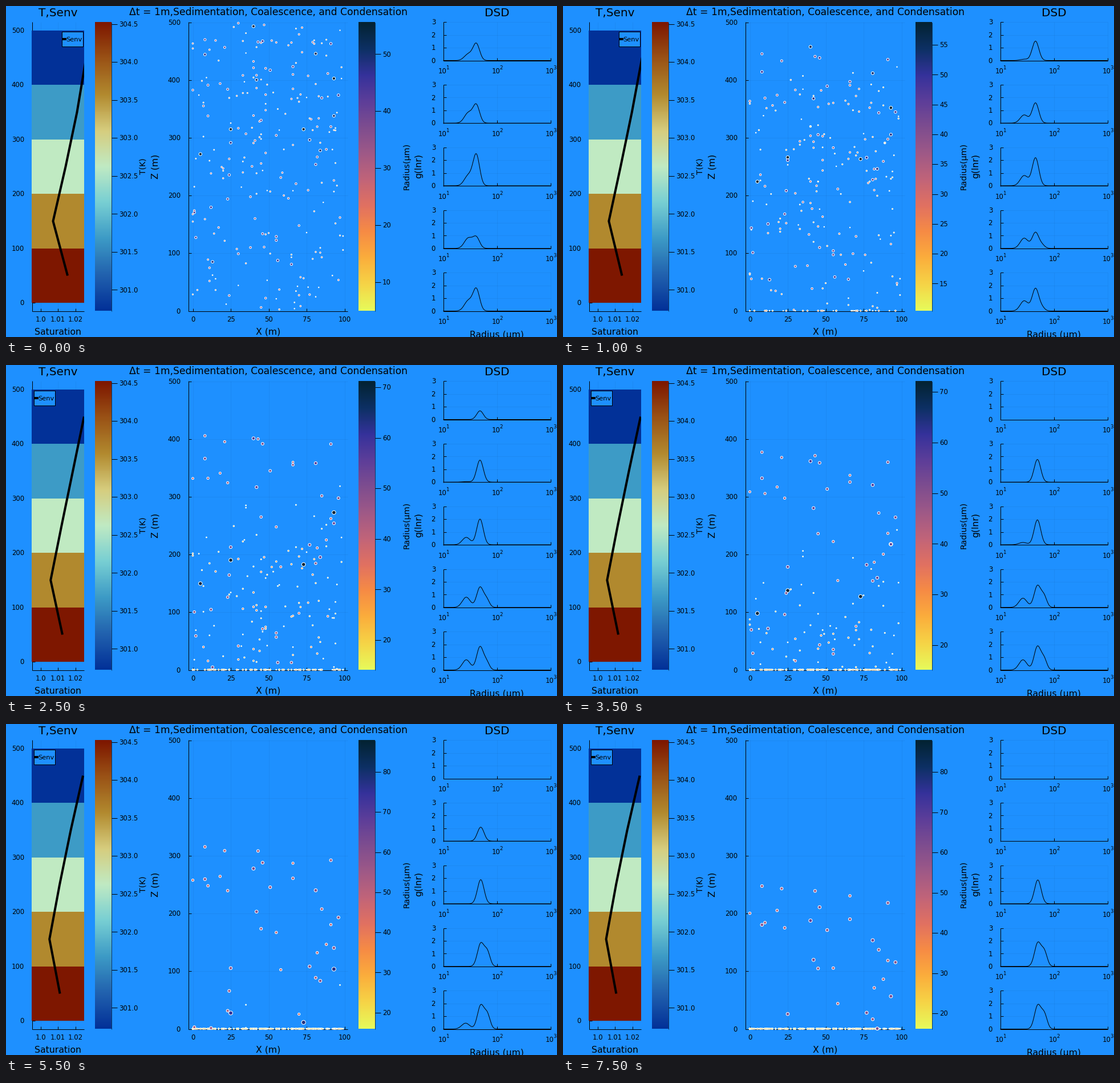
Recreate the animation shown at these times as a matplotlib script. Size 966x580 px, loop 8 s.

```python
import numpy as np
import matplotlib.pyplot as plt
from matplotlib.animation import FuncAnimation
from matplotlib.colors import LinearSegmentedColormap
from matplotlib.patches import Rectangle

W, H, DPI = 966, 580, 64
PT = 72 / DPI  # points per pixel
FRAMES, INTERVAL = 16, 500
SKY = "#1e90ff"

plt.rcParams["font.family"] = "DejaVu Sans"
fig = plt.figure(figsize=(W / DPI, H / DPI), dpi=DPI, facecolor=SKY)
ax = fig.add_axes([0, 0, 1, 1])


def color_map(name, stops):
    return LinearSegmentedColormap.from_list(name, stops.split())


heat = color_map("heat", "#023198 #2263af #3d9bc6 #78cfd3 #c0eac3 #d6cd7e #b28a2f #9a5316 #7e1700")
depth = color_map("depth", "#e7fa5a #f6d346 #fbad3c #f68b45 #e17161 #c16479 "
                           "#9e5987 #7e4d8f #5d3e99 #35329b #0d3064 #032333")


def line(xs, ys, width=1.0, **kw):
    kw = {"color": "black", "solid_capstyle": "butt", **kw}
    return ax.plot(xs, ys, lw=width * PT, **kw)[0]


def label(x, y, text, size=11.6, ha="center", **kw):
    """Text whose capitals are centred on y."""
    return ax.text(x, y + 0.36 * size, text, fontsize=size * PT, ha=ha, va="baseline", **kw)


def side_label(x, text, size):
    ax.text(x, 281, text, fontsize=size * PT, rotation=90, ha="center", va="center")


def axes_box(left, right, top, bottom, xticks, yticks):
    for x in xticks:
        line([x, x], [top, bottom], 0.6, alpha=0.08)
        line([x, x], [bottom - 5, bottom])
    for y in yticks:
        line([left, right], [y, y], 0.6, alpha=0.08)
        line([left, left + 5], [y, y])
    line([left, left], [top, bottom + 0.5])
    line([left, right], [bottom, bottom])


def color_bar(left, cmap):
    ax.imshow(np.linspace(1, 0, 256)[:, None], cmap=cmap, aspect="auto",
              extent=(left, left + 29, 534.5, 28.5), interpolation="bilinear")
    line([left + 29] * 2, [28.5, 534.5], 0.6)


def bar_tick(x, y, text):
    return [line([x, x + 10], [y, y]), label(x + 13, y, text, ha="left")]


# Temperature layers and environment saturation
layer_y = [42.6 + 95.5 * i for i in range(6)]
axes_box(45.5, 137, 28, 534.5, (60.5, 91, 121.5), layer_y)
for i, y in enumerate(layer_y):
    label(32, y, str(500 - 100 * i), ha="right")
    if i < 5:
        ax.add_patch(Rectangle((45, y), 91.5, 95.5, lw=0, antialiased=False,
                               color=heat(i / 4), zorder=3))
for i, text in enumerate(("1.0", "1.01", "1.02")):
    label(60.5 + 30.5 * i, 549, text)
label(91, 11, "T,Senv", 20)
label(91, 570, "Saturation", 15.7)

color_bar(156, heat)
for i in range(8):
    bar_tick(185, 31.5 + 66.57 * i, f"{304.5 - 0.5 * i:.1f}")
side_label(241, "T(K)", 14)

SENV_START = np.array([108, 82.5, 104.5, 124.5, 140.5])
SENV_END = np.array([92, 75, 92, 111.5, 134])
senv_y = 472.5 - 95.5 * np.arange(5)
senv_line = line([], [], 4, zorder=5, solid_joinstyle="round")
senv_line.set_clip_path(Rectangle((45, 28), 91.5, 506, transform=ax.transData))

legend_box = ax.add_patch(Rectangle((97.5, 44.5), 37, 26, fc=SKY, ec="black", lw=PT, zorder=6))
legend_key = line([], [], 4, zorder=7)
legend_text = label(105, 58, "Senv", 11.4, ha="left", zorder=7)

# Droplet chamber
X0, X_SCALE, GROUND = 327.5, 2.66, 534
x_ticks = [X0 + 66.5 * i for i in range(5)]
z_ticks = [534.5 - 101.2 * i for i in range(6)]
axes_box(319.5, 599, 28, 534.5, x_ticks, z_ticks)
for i, x in enumerate(x_ticks):
    label(x, 549, str(25 * i))
for i, y in enumerate(z_ticks):
    label(306, y, str(100 * i), ha="right")
label(459.5, 9.5, "Δt = 1m,Sedimentation, Coalescence, and Condensation", 17.1)
label(460, 570, "X (m)", 15.7)
side_label(262, "Z (m)", 15.7)
color_bar(618, depth)
side_label(703, "Radius(µm)", 14.2)

rng = np.random.default_rng(5)
SMALL, LARGE = 190, 36
small_size = rng.random(SMALL)
small_y = rng.uniform(30, 532, SMALL)

# Most prominent drops: column, starting height on the stage, starting speed
LEADERS = np.array([(8, 59, 12), (40, 35.5, 17.6), (43, 63, 12.3), (46, 61.5, 14.3),
                    (81, 83.5, 16.7), (91, 66, 13.5), (93, 127, 25.3), (73, 216, 25.7),
                    (25, 216, 24.2), (5, 259.5, 23.7)])
large_x = np.concatenate([LEADERS[:, 0], rng.integers(0, 100, LARGE)])
large_y = np.concatenate([LEADERS[:, 1], rng.uniform(70, 470, LARGE)])
large_speed = np.concatenate([LEADERS[:, 2], rng.uniform(9, 16, LARGE)])

drop_x = X0 + X_SCALE * np.concatenate([rng.integers(0, 100, SMALL), large_x])
drops = ax.scatter(drop_x, drop_x, edgecolors="white", linewidths=PT, zorder=5)


def drop_state(k, low, high):
    """Heights and radii; condensation makes every drop fall faster with time."""
    small_fall = (32 * k + 0.65 * k * k) * (0.95 + 0.9 * small_size)
    large_fall = large_speed * k + 0.2 * k * k
    y = np.concatenate([small_y + small_fall, large_y + large_fall])
    large_r = 50 * ((large_speed + 0.4 * k) / 16) ** 0.7
    r = np.clip(np.concatenate([10 + 26 * small_size, large_r]), low, high)
    return np.minimum(y, GROUND), np.where(y >= GROUND, np.minimum(r, 25), r)


# Size distributions
UNIT, DECADE, LEFT = 22.4, 94, 766.5
BASES = [95.5 + 109.75 * i for i in range(5)]
offset = np.linspace(0, 188, 377)
curves = []
for base in BASES:
    axes_box(LEFT, 954.5, base - 3 * UNIT, base, [LEFT + DECADE * i for i in range(3)],
             [base - UNIT * i for i in range(4)])
    for i in range(4):
        label(753, base - UNIT * i, str(i), ha="right")
    for i in range(3):
        x = LEFT + DECADE * i
        label(x - 9, base + 18.5, "10", ha="left")
        label(x + 5, base + 12.5, str(i + 1), 8.8, ha="left")
    curves.append(line([], [], zorder=5))
label(860.5, 11, "DSD", 20)
label(860.5, 575, "Radius (µm)", 15.6)
side_label(724, "g(lnr)", 15.7)

START_PEAK = (1.3, 1.4, 2.4, 0.85, 1.7)


def bump(center, height, width):
    return height * np.exp(-0.5 * ((offset - center) / width) ** 2)


def distribution(layer, k):
    """Layers empty from the top down: first the fine mode, then the main one."""
    settle = np.exp(-k / 4)
    peak = START_PEAK[layer] * settle + 1.85 * (1 - settle)
    main = peak * np.clip((7 * (layer + 1) - k) / 5, 0, 1)
    fine = 0.8 * np.clip((2.5 + 2.7 * layer - k) / 4, 0, 1)
    tail = 1.1 * min(1, k / 9) * (layer > 2)
    main_pos = 66 - 8 * np.exp(-k / 3)
    return (bump(main_pos, main, 5.8) + bump(39 + 5 * settle, fine, 7)
            + bump(main_pos + 11.5, tail, 5))


radius_marks = []


def draw_radius_ticks(low, high):
    while radius_marks:
        radius_marks.pop().remove()
    step = 5 if high - low < 50 else 10
    for r in range(step * int(np.ceil(low / step)), int(high) + 1, step):
        y = 28.5 + 506 * (high - r) / (high - low)
        radius_marks.extend(bar_tick(647, y, str(r)))


def draw(k):
    senv_line.set_data(SENV_END + (SENV_START - SENV_END) * np.exp(-k / 6), senv_y)
    left = 97.5 if k < 3 else 48.5
    legend_box.set_x(left)
    legend_key.set_data([left, left + 8.5], [58, 58])
    legend_text.set_x(left + 8)

    low = 16.2 - 11.3 * np.exp(-k / 3)
    high = np.interp(k, (0, 2, 4, 5, 9, 10, 11), (55.6, 58.8, 64, 71.2, 73, 87.5, 87.9))
    draw_radius_ticks(low, high)
    y, r = drop_state(k, low, high)
    drops.set_offsets(np.column_stack([drop_x, y]))
    drops.set_sizes(((0.085 * r + 0.5) * PT) ** 2)
    drops.set_facecolor(depth((r - low) / (high - low)))

    for layer, (curve, base) in enumerate(zip(curves, BASES)):
        curve.set_data(LEFT + offset, base - UNIT * distribution(layer, k))
    return []


ax.set_xlim(0, W)
ax.set_ylim(H, 0)
ax.axis("off")

animation = FuncAnimation(fig, draw, frames=FRAMES, interval=INTERVAL,
                          init_func=lambda: draw(0), repeat=True, repeat_delay=0)
plt.show()
```
